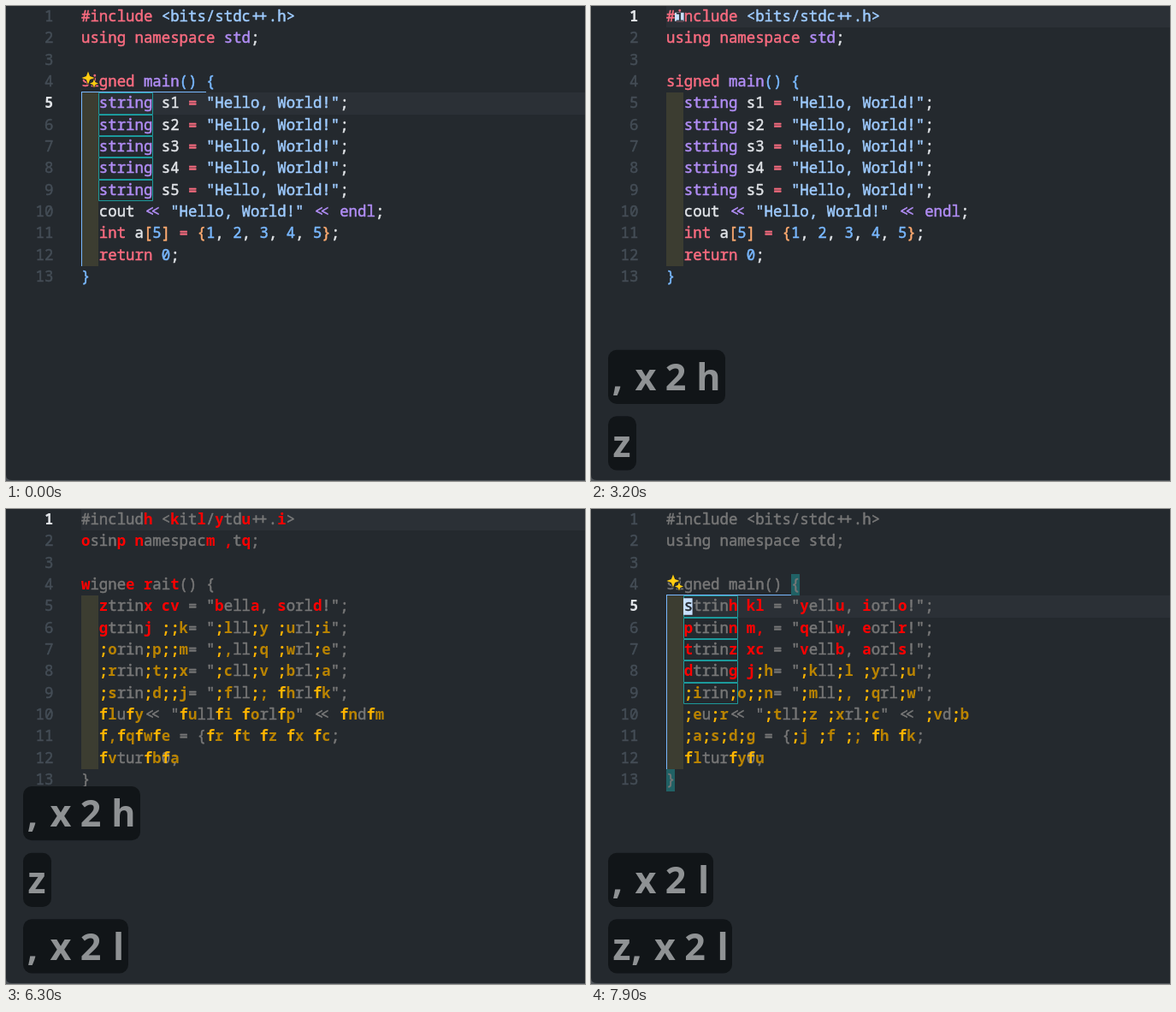
Write an HTML page with a canvas that moves like this. It is 677x555 px and loops after 8000 ms.

```html
<!DOCTYPE html>
<html lang="en">
<head>
<meta charset="utf-8">
<title>Jump labels in an editor</title>
<style>
  html, body { margin: 0; width: 100%; height: 100%; overflow: hidden; background: #24292e; }
  canvas { display: block; width: 677px; height: 555px; }
</style>
</head>
<body>
<canvas id="stage"></canvas>
<script>
const W = 677, H = 555, LOOP = 8000;
const LEFT = 88, CELL = 10.42, ROW = 25.33, BASELINE = 18;
const MONO = '"Noto Sans Mono", "DejaVu Sans Mono", monospace';
const COLOR = {
  bg: '#24292e', text: '#e1e4e8', keyword: '#fa6c80', string: '#9ecbff', name: '#b18df5',
  number: '#79b8ff', inner: '#ffab70', dim: '#777777', gutter: '#444d56', activeLine: '#2b3036',
  caret: '#c8e1ff', match: '#206165', word: '#1c9a9c', indent: '#3c3d31', spark: '#ffcc11',
  single: '#ff0000', first: '#ffb400', second: '#b98300'
};

const lines = [
  '#include <bits/stdc++.h>',
  'using namespace std;',
  '',
  'signed main() {',
  ...[1, 2, 3, 4, 5].map(n => `  string s${n} = "Hello, World!";`),
  '  cout << "Hello, World!" << endl;',
  '  int a[5] = {1, 2, 3, 4, 5};',
  '  return 0;',
  '}'
];

const rules = [
  ['string', /^("[^"]*"|<bits.*>)/],
  ['keyword', /^(#include|using|namespace|signed|int\b|return|=)/],
  ['name', /^(std|string|main|<<|endl)/],
  ['text', /^[a-z]\w*/],
  ['number', /^\d/],
  ['bracket', /^[(){}[\]]/],
  ['text', /^./]
];

function colorize(line, row) {
  const colors = [];
  while (colors.length < line.length) {
    const rest = line.slice(colors.length);
    const [kind, rule] = rules.find(r => r[1].test(rest));
    const tone = kind === 'bracket' ? (row === 10 ? 'inner' : 'number') : kind;
    for (const _ of rest.match(rule)[0]) colors.push(COLOR[tone]);
  }
  return colors;
}
const colors = lines.map(colorize);

// Every word offers its first and last letter as a jump target.
const targets = lines.flatMap((line, row) =>
  [...line.matchAll(/[a-z0-9]+/gi)].flatMap(m => {
    const end = m.index + m[0].length - 1;
    return [...new Set([m.index, end])].map(col => ({ row, col }));
  }));

const LETTERS = 'hklyuiopnm,qwertzxcvbasdgjf;';
function labelName(i) {
  const singles = LETTERS.length - 2;
  if (i < singles) return LETTERS[i];
  const n = i - singles;
  return ';f'[Math.floor(n / LETTERS.length)] + LETTERS[n % LETTERS.length];
}

function makeLabels(from, direction) {
  const ahead = p => ((p.row - from.row) * 100 + p.col - from.col) * direction > 0;
  const found = targets.filter(ahead);
  if (direction < 0) found.reverse();
  return found.map((p, i) => ({ ...p, name: labelName(i) }));
}

const top0 = { row: 0, col: 1 }, body = { row: 4, col: 2 };
const hops = [
  { from: 1800, to: 2800, labels: makeLabels(body, -1) },
  { from: 4600, to: 6400, labels: makeLabels(top0, 1) },
  { from: 7900, to: 8000, labels: makeLabels(body, 1) }
];

const keySteps = [
  [0], [1000, ','], [1200, ', x 2'], [1800, ', x 2 h'],
  [2800, ', x 2 h', 'z'], [3900, ', x 2 h', 'z', ','],
  [4100, ', x 2 h', 'z', ', x 2'], [4600, ', x 2 h', 'z', ', x 2 l'],
  [6400, 'z', ', x 2 l', 'z'], [7300, 'z', ', x 2 l', 'z,'],
  [7500, 'z', ', x 2 l', 'z, x 2'], [7600, ', x 2 l', 'z, x 2'],
  [7900, ', x 2 l', 'z, x 2 l']
];
const keyRight = {
  ',': 43, ', x 2': 129, ', x 2 h': 157, ', x 2 l': 143,
  'z': 53, 'z,': 66, 'z, x 2': 152, 'z, x 2 l': 165
};
const keyAdvance = { ',': 15, ' ': 13, x: 25, 2: 19, h: 32, l: 20, z: 20 };

// Midpoints of the caret's alternating shrink and grow phases.
const caretTurns = [1050, 1290, 1790, 2280, 2730, 3220];
for (let t = 3450; t < LOOP; t += 450) caretTurns.push(t);

function caretScale(t) {
  if (t < 700 || (t >= 2800 && t < 3150)) return 0;
  const SPAN = 264;
  let scale = 1;
  caretTurns.forEach((mid, i) => {
    const p = Math.min(1, Math.max(0, (t - mid) / SPAN + 0.5));
    if (p <= 0) return;
    const e = p * p * (3 - 2 * p);
    scale = i % 2 ? e : 1 - e;
  });
  return scale;
}

const canvas = document.getElementById('stage');
const ctx = canvas.getContext('2d');
const ratio = window.devicePixelRatio || 1;
canvas.width = W * ratio;
canvas.height = H * ratio;
ctx.scale(ratio, ratio);

const rowTop = row => row * ROW;
const colX = col => LEFT + col * CELL;

function rect(x, y, w, h, color) {
  ctx.fillStyle = color;
  ctx.fillRect(x, y, w, h);
}

// Regular text gets a hairline outline for a medium weight.
function codeText(text, x, row, color, bold, align = 'left') {
  const y = rowTop(row) + BASELINE;
  ctx.font = `${bold ? 700 : 400} 17.36px ${MONO}`;
  ctx.textAlign = align;
  ctx.fillStyle = ctx.strokeStyle = color;
  ctx.fillText(text, x, y);
  if (bold) return;
  ctx.lineWidth = 0.5;
  ctx.lineJoin = 'round';
  ctx.strokeText(text, x, y);
}

const glyph = (ch, row, col, color, bold) => codeText(ch, colX(col), row, color, bold);

// Doubled operators sit closer together, like a ligature.
function pairShift(line, col) {
  const ch = line[col];
  if (ch !== '<' && ch !== '+') return 0;
  const shift = ch === '<' ? 0.17 : 0.12;
  return line[col + 1] === ch ? shift : line[col - 1] === ch ? -shift : 0;
}

function star(x, y, r) {
  const k = r * 0.28;
  ctx.beginPath();
  for (let i = 0; i < 8; i++) {
    const a = i * Math.PI / 4, d = i % 2 ? k * 1.4 : r;
    ctx.lineTo(x + d * Math.sin(a), y - d * Math.cos(a));
  }
  ctx.closePath();
  ctx.lineJoin = 'round';
  ctx.lineWidth = 1.5;
  ctx.strokeStyle = COLOR.bg;
  ctx.stroke();
  ctx.fillStyle = COLOR.spark;
  ctx.fill();
}

function drawGutter(active) {
  lines.forEach((_, row) => {
    const on = row === active;
    codeText(row + 1, 55.3, row, on ? COLOR.text : COLOR.gutter, on, 'right');
  });
}

function drawScope(t) {
  if (t >= 700) {
    rect(234, 76, 10, 25, COLOR.match);
    rect(88, 304, 10, 26, COLOR.match);
  }
  rect(88, 100, 146, 1, COLOR.number);
  rect(88, 100, 1, 204, COLOR.number);
}

function drawWordBoxes() {
  ctx.strokeStyle = COLOR.word;
  ctx.lineWidth = 1;
  for (let row = 4; row < 9; row++) {
    const y = Math.round(rowTop(row));
    ctx.strokeRect(108.5, y + 0.5, 63, Math.round(rowTop(row + 1)) - y - 1);
  }
}

function drawCode(labels) {
  const cover = new Map();
  for (const { row, col, name } of labels || []) {
    [...name].forEach((ch, i) => {
      const color = name.length === 1 ? COLOR.single : i ? COLOR.second : COLOR.first;
      cover.set(row * 100 + col + i, { ch, color });
    });
  }
  lines.forEach((line, row) => {
    for (let col = 0; col <= line.length; col++) {
      const label = cover.get(row * 100 + col);
      const seeThrough = row === 11 && col > 8;
      if (line[col] && (!label || seeThrough)) {
        const color = labels ? COLOR.dim : colors[row][col];
        glyph(line[col], row, col + pairShift(line, col), color);
      }
      if (label) glyph(label.ch, row, col, label.color, true);
    }
  });
}

function drawCaret({ row, col }, scale) {
  if (scale < 0.02) return;
  const h = ROW * scale, y = rowTop(row) + (ROW - h) / 2;
  ctx.save();
  ctx.beginPath();
  ctx.rect(Math.floor(colX(col)), y, 10.6, h);
  ctx.clip();
  rect(0, 0, W, H, COLOR.caret);
  glyph(lines[row][col], row, col, COLOR.bg);
  ctx.restore();
}

function drawKeys(boxes) {
  boxes.forEach((label, i) => {
    const y = 479.3 - (boxes.length - 1 - i) * 77.6;
    ctx.fillStyle = '#111518';
    ctx.beginPath();
    ctx.roundRect(20, y, keyRight[label] - 20, 63.2, 10);
    ctx.fill();
    ctx.font = '700 43px "Open Sans", "Noto Sans", sans-serif';
    ctx.textAlign = 'center';
    ctx.fillStyle = '#8f9294';
    let x = label[0] === ',' ? 23.5 : 26;
    for (const ch of label) {
      ctx.fillText(ch, x + keyAdvance[ch] / 2, y + 47.3);
      x += keyAdvance[ch];
    }
  });
}

function drawCorner() {
  ctx.fillStyle = '#50555a';
  ctx.beginPath();
  ctx.moveTo(0, H - 7);
  ctx.quadraticCurveTo(0, H - 1, 7, H - 1);
  ctx.lineTo(W, H - 1);
  ctx.lineTo(W, H);
  ctx.lineTo(0, H);
  ctx.fill();
}

function draw(t) {
  const caret = t >= 2800 && t < 6400 ? top0 : body;
  const inBody = caret === body;
  const hop = hops.find(h => t >= h.from && t < h.to);

  rect(0, 0, W, H, COLOR.bg);
  rect(LEFT, Math.round(rowTop(caret.row)), W - LEFT, inBody ? 26 : 25, COLOR.activeLine);
  rect(LEFT, 101, 20, 203, COLOR.indent);
  drawGutter(caret.row);
  if (inBody) drawScope(t);
  drawCode(hop && hop.labels);
  if (t < 2800 || t >= 6700) drawWordBoxes();
  drawCaret(caret, caretScale(t));
  if (t < 3000 || t >= 6900) {
    star(96, 84, 7.6);
    star(103, 90.5, 5);
  }
  drawCorner();
  drawKeys(keySteps.findLast(s => t >= s[0]).slice(1));
}

function frame() {
  draw(performance.now() % LOOP);
  requestAnimationFrame(frame);
}
frame();
</script>
</body>
</html>
```
